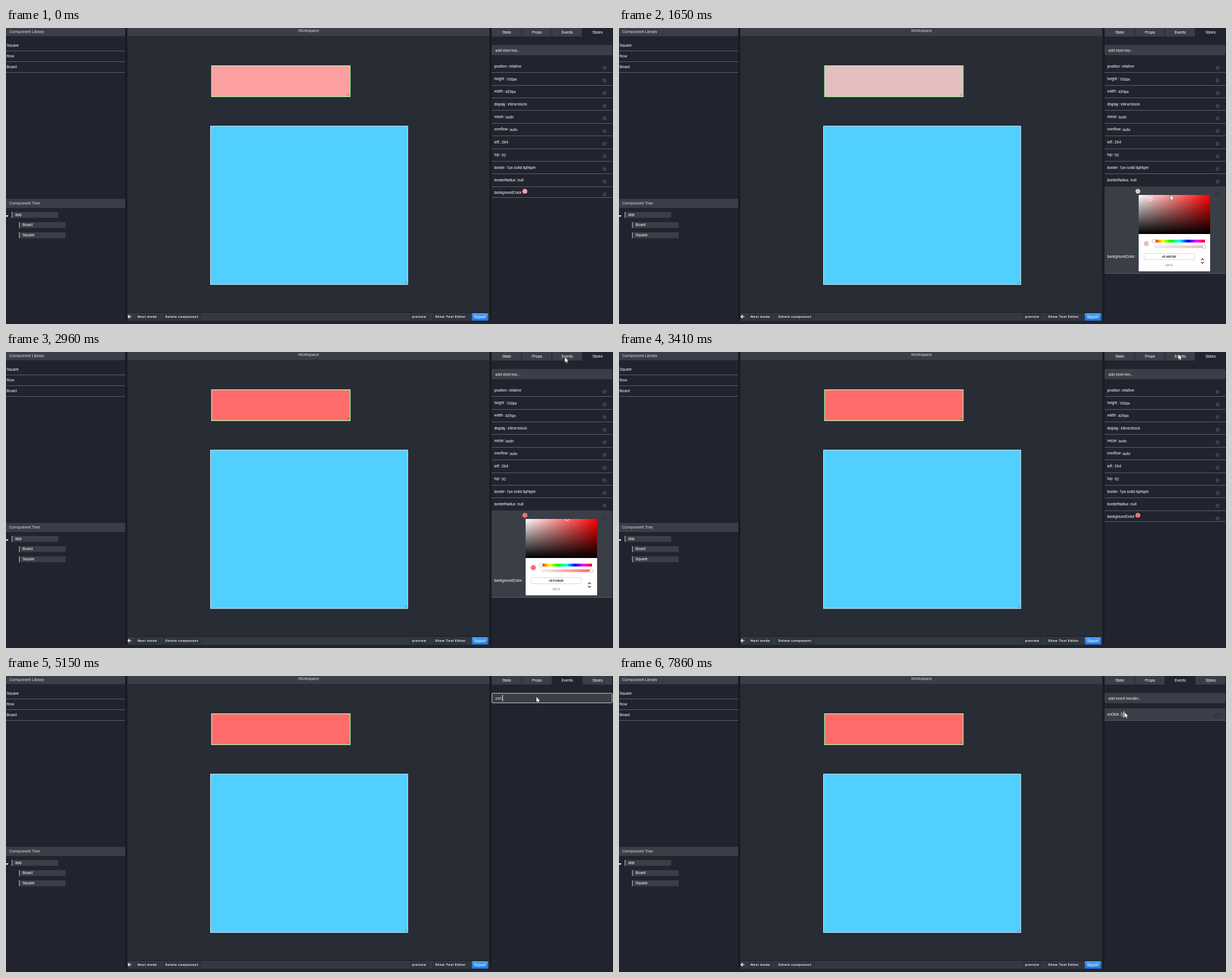
Write an HTML page with a canvas that moves like this. It is 1070x523 px and loops after 8 s.

```html
<!DOCTYPE html>
<html lang="en">
<head>
<meta charset="utf-8">
<title>Component editor</title>
<style>
  html, body { margin: 0; width: 100%; height: 100%; overflow: hidden; background: #21242e; }
  canvas { display: block; }
</style>
</head>
<body>
<canvas id="stage" width="1070" height="523"></canvas>
<script>
const ctx = document.getElementById('stage').getContext('2d');
const LOOP = 8000;
const C = {
  panel: '#21242e', work: '#282c34', bar: '#3a3e47', gap: '#1a1c23',
  line: '#5f626b', text: '#f0f1f3', title: '#c9cbd0', dot: '#3b3f48'
};
const FONT = {
  ui: ['400 7.2px Roboto, sans-serif', '-0.2px'],
  key: ['400 6.9px Roboto, sans-serif', '-0.3px'],
  title: ['400 8px Roboto, sans-serif', '-0.35px'],
  button: ['700 6px Roboto, sans-serif', '0.55px'],
  hex: ['700 6.2px "Liberation Serif", serif', '0px']
};
const OPEN = 1030, CLOSE = 3410, EVENTS = 3640, FOCUS = 4090, ENTER = 5970, EDIT = 6740;

// Keyframes: [time, a, b]
const POINTER = [
  [60, 985, 500], [480, 930, 310], [650, 917, 274], [800, 915, 287], [1030, 915, 287],
  [1350, 937, 302], [1500, 937, 302], [1650, 972, 295], [1770, 982, 294], [1850, 985, 293],
  [2070, 988, 290], [2310, 988, 290], [2380, 986, 280], [2960, 985, 9], [3190, 985, 8],
  [3260, 986, 4], [3640, 986, 4], [4160, 935, 37], [6370, 935, 37], [6800, 891, 64]
];
const SHADE = [
  [1400, .365, .985], [1500, .162, .894], [1650, .162, .894],
  [1770, .43, .965], [1850, .5, .985], [2070, .58, 1]
];
const TYPED = [[4760, 'o'], [4840, 'on'], [5150, 'onC'], [5210, 'onCl'], [5370, 'onCli'],
  [5510, 'onClic'], [5590, 'onClick']];
const STYLES = [
  ['position :', 'relative', 886.5], ['height :', '100px', 882], ['width :', '439px', 880],
  ['display :', 'inline-block', 884.5], ['resize :', 'both', 881], ['overflow :', 'auto', 888],
  ['left :', '264', 873.5], ['top :', '92', 873.5], ['border :', '1px solid lightgreen', 882.5],
  ['borderRadius :', 'null', 901.5]
];

function track(keys, t) {
  if (t <= keys[0][0]) return keys[0].slice(1);
  for (let i = 1; i < keys.length; i++) {
    const [t0, a0, b0] = keys[i - 1], [t1, a1, b1] = keys[i];
    if (t < t1) {
      const k = (t - t0) / (t1 - t0);
      return [a0 + (a1 - a0) * k, b0 + (b1 - b0) * k];
    }
  }
  return keys[keys.length - 1].slice(1);
}

function rect(x, y, w, h, fill) {
  ctx.fillStyle = fill;
  ctx.fillRect(x, y, w, h);
}

function frame(x, y, w, h, color, radius = 0) {
  ctx.strokeStyle = color;
  ctx.lineWidth = 1;
  ctx.beginPath();
  ctx.roundRect(x + .5, y + .5, w - 1, h - 1, radius);
  ctx.stroke();
}

function circle(x, y, r, fill, stroke) {
  ctx.beginPath();
  ctx.arc(x, y, r, 0, 7);
  if (fill) { ctx.fillStyle = fill; ctx.fill(); }
  if (stroke) { ctx.strokeStyle = stroke; ctx.lineWidth = 1; ctx.stroke(); }
}

function path(points, stroke, width = 1, fill) {
  ctx.beginPath();
  points.forEach(([x, y], i) => i ? ctx.lineTo(x, y) : ctx.moveTo(x, y));
  if (fill) { ctx.closePath(); ctx.fillStyle = fill; ctx.fill(); }
  if (stroke) { ctx.strokeStyle = stroke; ctx.lineWidth = width; ctx.stroke(); }
}

// Returns the x where the text ends.
function text(str, x, y, { font = 'ui', color = C.text, align = 'left' } = {}) {
  [ctx.font, ctx.letterSpacing] = FONT[font];
  ctx.textAlign = align;
  ctx.textBaseline = 'middle';
  ctx.fillStyle = color;
  ctx.fillText(str, x, y);
  return x + ctx.measureText(str).width;
}

function blend(x0, y0, x1, y1, colors) {
  const g = ctx.createLinearGradient(x0, y0, x1, y1);
  colors.forEach((c, i) => g.addColorStop(i / (colors.length - 1), c));
  return g;
}

function leftPanel() {
  rect(0, 0, 210, 523, C.panel);
  rect(0, 0, 210, 14.5, C.bar);
  text('Component Library', 5.5, 7, { font: 'title', color: C.title });
  ['Square', 'Row', 'Board'].forEach((name, i) => {
    text(name, 1, 31 + 19 * i);
    rect(0, 40 + 19 * i, 210, 1, C.line);
  });
  rect(0, 302, 210, 16, C.bar);
  text('Component Tree', 5.5, 310, { font: 'title', color: C.title });
  path([[-1, 331], [4.5, 331], [1.8, 334]], null, 0, '#fff');
  [['app', 10], ['Board', 23], ['Square', 23]].forEach(([name, x], i) => {
    const y = 325 + 18 * i;
    rect(x, y, 82, 10.5, C.bar);
    rect(x, y, 1, 10.5, '#c4c6ca');
    text(name, x + 6, y + 5);
  });
}

function grip(x, y) {
  path([[x - 5, y], [x, y - 5]], '#0006', .7);
  path([[x - 2.5, y], [x, y - 2.5]], '#0006', .7);
}

function workspace(color) {
  rect(214, 0, 638, 502, C.work);
  rect(214, 0, 638, 14, C.bar);
  text('Workspace', 533, 4.5, { font: 'title', color: C.title, align: 'center' });
  rect(361.7, 66, 245.6, 56, '#a5f0a5');
  rect(363.2, 67.5, 242.6, 53, color);
  grip(605.3, 120);
  rect(360, 172.8, 348.7, 280.9, '#e6f4fa');
  rect(361, 173.8, 346.7, 278.9, '#51cfff');
  grip(707.2, 452.2);

  rect(214, 502, 638, 1, C.gap);
  rect(214, 503, 638, 14.5, '#343841');
  path([[221, 510], [215, 510]], '#fff', 1.3);
  path([[218, 507], [215, 510], [218, 513]], '#fff', 1.3);
  [['Nest mode', 232, 227, 45], ['Delete component', 281, 276, 70],
   ['preview', 716, 711, 36], ['Show Text Editor', 756.5, 751, 67]].forEach(([label, tx, x, w]) => {
    rect(x, 504, w, 13, '#30343c');
    text(label, tx, 510.5, { font: 'button', color: '#e4e5e8' });
  });
  ctx.fillStyle = blend(0, 504, 0, 517, ['#4ba7fb', '#1b76ea']);
  ctx.beginPath();
  ctx.roundRect(821.5, 504, 28, 13, 1.5);
  ctx.fill();
  text('Export', 835.5, 510.5, { color: '#fff', align: 'center' });
}

function tabs(active) {
  ['State', 'Props', 'Events', 'Styles'].forEach((name, i) => {
    const x = 856 + 53.4 * i;
    if (name !== active) rect(x, 0, 52.4, 15, C.bar);
    text(name, x + 26.5, 7.5, { align: 'center' });
  });
}

function inputBox(label, focused) {
  rect(857, 31, 211, 16, C.bar);
  frame(856, 30, 213, 18, focused ? '#c9cbd0' : '#3c4049', 1.5);
  return text(label, 862.5, 39.5, { color: '#e2e3e6' });
}

function caret(x, y) {
  rect(Math.round(x), y, 1, 12, '#e8e9ec');
}

function row(top, bottom, dotY, hover) {
  if (hover) rect(856, top, 213, bottom - top, C.bar);
  rect(856, bottom - 1, 213, 1, C.line);
  circle(1055, dotY, 3.6, hover ? null : C.dot, hover ? '#23262f' : null);
}

function picker(color, [s, v]) {
  const x = 916, y = 295, w = 126, h = 69;
  rect(x, y, w, 135, '#fff');
  rect(x, y, w, h, blend(x, 0, x + w, 0, ['#fff', '#f00']));
  rect(x, y, w, h, blend(0, y, 0, y + h, ['#0000', '#000']));
  ctx.save();
  ctx.beginPath();
  ctx.rect(x, y, w, h);
  ctx.clip();
  circle(x + w * s, y + h * (1 - v), 3.2, null, '#fffc');
  ctx.restore();

  circle(929.5, 381, 4.6, color);
  rect(943, 374, 90, 5, blend(943, 0, 1033, 0, ['#f00', '#ff0', '#0f0', '#0ff', '#00f', '#f0f', '#f00']));
  for (let i = 0; i < 36; i++) rect(943 + i * 2.5, 384 + (i % 2) * 2.5, 2.5, 2.5, '#e2e2e2');
  rect(943, 384, 90, 5, blend(943, 0, 1033, 0, [color + '00', color]));
  [[943, 376.5], [1031.5, 386.5]].forEach(([hx, hy]) => circle(hx, hy, 3.2, '#fafafa', '#0003'));

  frame(925, 398, 90, 12, '#d6d6d6', 1.5);
  text(color, 970, 404.2, { font: 'hex', color: '#333', align: 'center' });
  text('HEX', 970, 419.7, { font: 'hex', color: '#999', align: 'center' });
  path([[1026, 410], [1028.5, 407.5], [1031, 410]], '#333', 1.1);
  path([[1026, 413.5], [1028.5, 416], [1031, 413.5]], '#333', 1.1);
}

function stylesTab(t, color, shade, pointer) {
  const open = t >= OPEN && t < CLOSE;
  const over = (a, b) => !open && t >= 60 && pointer[1] >= a && pointer[1] < b;
  inputBox('add style key...', false);
  STYLES.forEach(([key, value, x], i) => {
    const top = Math.round(57 + 22.35 * i), bottom = Math.round(79.4 + 22.35 * i);
    const y = 67.7 + 22.35 * i;
    row(top, bottom, y + 2.6, over(top, bottom));
    text(key, 860.5, y, { font: 'key' });
    ctx.save();
    ctx.beginPath();
    ctx.rect(856, top, 78, 22);
    ctx.clip();
    text(value, x, y + .5);
    ctx.restore();
  });
  const bottom = open ? 434 : 300;
  row(280, bottom, 294, open || over(280, bottom));
  text('backgroundColor :', 860.5, open ? 403.7 : 290.5, { font: 'key' });
  circle(914.7, 288.5, 4, color, '#ffffff40');
  if (open) picker(color, shade);
}

function eventsTab(t, pointer) {
  const typing = t >= TYPED[0][0] && t < ENTER;
  const focused = t >= FOCUS && t < EDIT;
  const typed = TYPED.reduce((last, [at, str]) => t >= at ? str : last, '');
  const end = inputBox(typing ? typed : 'add event handler...', focused);
  const blinkedOff = (t >= 4550 && t < 4760) || t >= 6470;
  if (focused && !blinkedOff) caret(typing ? end : 862, 33);
  if (t < ENTER) return;

  row(57, 79, 70, pointer[1] >= 57);
  text('onClick :', 860.5, 67.7, { font: 'key' });
  const value = t < 7630 ? 'null' : t < 7860 ? '(' : '()';
  const valueEnd = text(value, 884.3, 68);
  if (t >= 7630) caret(valueEnd, 62);
  else if (t >= EDIT && t < 7340) caret(884, 62);
}

function arrow([x, y]) {
  const shape = [[0, 0], [0, 9.2], [2.1, 7.2], [3.6, 10.6], [5, 10], [3.6, 6.7], [6.4, 6.5], [0, 0]];
  path(shape.map(([dx, dy]) => [x + dx, y + dy]), '#111', 1);
  path(shape.map(([dx, dy]) => [x + dx, y + dy]), null, 0, '#fff');
}

function draw(t) {
  const pointer = track(POINTER, t), shade = track(SHADE, t);
  const [s, v] = shade;
  const hex = n => Math.round(255 * n).toString(16).padStart(2, '0').toUpperCase();
  const color = '#' + hex(v) + hex(v * (1 - s)).repeat(2);
  const onEvents = t >= EVENTS;

  rect(0, 0, 1070, 523, C.gap);
  rect(210, 517.5, 646, 6, C.panel);
  leftPanel();
  workspace(color);
  rect(856, 0, 213, 523, C.panel);
  tabs(onEvents ? 'Events' : 'Styles');
  if (onEvents) eventsTab(t, pointer);
  else stylesTab(t, color, shade, pointer);
  if (t >= 60) arrow(pointer);
}

const start = performance.now();
function tick() {
  draw((performance.now() - start) % LOOP);
  requestAnimationFrame(tick);
}
tick();
</script>
</body>
</html>
```
